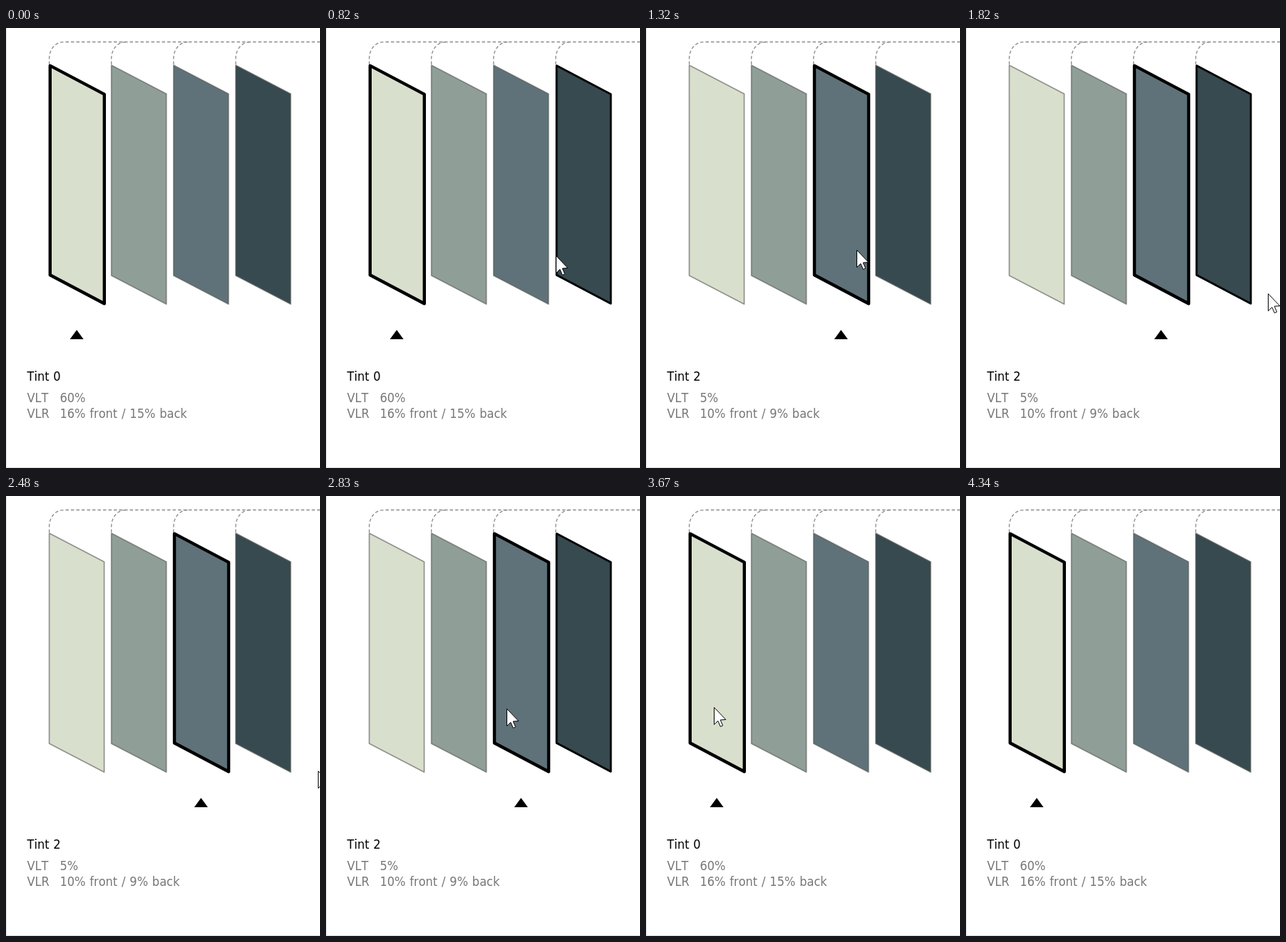
An HTML page with a canvas for the animation above (5180 ms loop, 440 by 615 pixels).

```html
<!DOCTYPE html>
<html lang="en">
<head>
<meta charset="utf-8">
<title>Tint states</title>
<style>
html, body { margin: 0; width: 100%; height: 100%; overflow: hidden; background: #fff; }
canvas { display: block; }
</style>
</head>
<body>
<canvas id="stage" width="440" height="615"></canvas>
<script>
const ctx = document.getElementById('stage').getContext('2d');
const LOOP = 5180;
const TICK = 167; // the pointer is redrawn about six times a second
const WIDTH = 77, SLOPE = 40, TOP = 52, HEIGHT = 294;

const tints = ['#d8dfcd', '#8f9f98', '#5f7279', '#364a50'];
const info = {
  0: ['60%', '16% front / 15% back'],
  2: ['5%', '10% front / 9% back']
};

// Each visit of the pointer: stops as [time, x, y]
const visits = [
  { end: 1980, stops: [[490, 407, 386], [990, 295, 310], [1660, 295, 310], [1820, 423, 371]] },
  { end: 4340, stops: [[2480, 437, 384], [2830, 253, 297], [3170, 171, 295],
    [3330, 100, 295], [3500, 95, 295], [4000, 95, 295], [4170, 153, 327]] }
];
const hover = [
  [0, -1], [820, 3], [990, 2], [1320, -1], [1820, 3], [1980, -1],
  [2830, 3], [3000, 1], [3500, 0], [3670, -1]
];
const selected = [[0, 0], [1320, 2], [3670, 0]];

const at = (track, t) => track.filter(key => key[0] <= t).pop()[1];
const panelX = i => 60.6 + 87.1 * i;
const easeOut = (u, power) => 1 - (1 - u) ** power;
const mix = (a, b, u) => a + (b - a) * u;

function pointerAt(t) {
  const visit = visits.find(({ stops, end }) => t >= stops[0][0] && t < end);
  if (!visit) return null;
  const { stops } = visit;
  const next = stops.findIndex(stop => stop[0] > t);
  if (next < 0) return stops[stops.length - 1].slice(1);
  const [t0, x0, y0] = stops[next - 1];
  const [t1, x1, y1] = stops[next];
  const steps = Math.round((t1 - t0) / TICK);
  const u = Math.floor((t - t0) / (t1 - t0) * steps + 0.09) / steps;
  return [mix(x0, x1, easeOut(u, 1.3)), mix(y0, y1, easeOut(u, 2))].map(Math.round);
}

function polygon(points) {
  ctx.beginPath();
  points.forEach(([x, y]) => ctx.lineTo(x, y));
  ctx.closePath();
}

function stroke(color, width) {
  ctx.strokeStyle = color;
  ctx.lineWidth = width;
  ctx.stroke();
}

function drawFrame() {
  ctx.fillStyle = '#fff';
  ctx.fillRect(0, 0, 440, 615);
  ctx.fillStyle = '#dedede';
  ctx.fillRect(0, 0, 1, 615);
  ctx.fillRect(0, 614, 440, 1);
}

function drawWires() {
  ctx.setLineDash([4.5, 3]);
  tints.forEach((_, i) => {
    const x = panelX(i);
    ctx.beginPath();
    ctx.moveTo(x, 51);
    ctx.lineTo(x, 43);
    ctx.bezierCurveTo(x, 30, x + 8, 19.5, x + 21, 19.5);
    if (!i) ctx.lineTo(440, 19.5);
    stroke('#8b8b8b', 1.3);
  });
  ctx.setLineDash([]);
}

function slab(left, right, top, height) {
  polygon([[left, top], [right, top + SLOPE], [right, top + SLOPE + height], [left, top + height]]);
}

function drawPanel(i, isSelected, isHovered) {
  const x = panelX(i);
  slab(x, x + WIDTH, TOP, HEIGHT);
  ctx.fillStyle = tints[i];
  ctx.fill();
  if (!isSelected && !isHovered) return stroke('rgba(85, 85, 80, 0.6)', 1.7);
  slab(x + 1.2, x + WIDTH + 0.2, TOP + 0.6, HEIGHT - 1.4);
  stroke('#000', isSelected ? 4.4 : 2.8);
}

function drawMarker(x) {
  polygon([[x, 422], [x + 9.5, 435], [x - 9.5, 435]]);
  ctx.fillStyle = '#000';
  ctx.fill();
}

function drawText(index) {
  const [vlt, vlr] = info[index];
  const put = (text, x, y, color) => {
    ctx.fillStyle = color;
    ctx.fillText(text, x, y);
  };
  ctx.font = '18px "DejaVu Sans Condensed", "Noto Sans", sans-serif';
  ctx.fontKerning = 'none';
  ctx.wordSpacing = '0.7px';
  put('Tint ' + index, 29.5, 493, '#000');
  [['VLT', vlt], ['VLR', vlr]].forEach(([label, value], row) => {
    const y = 523 + 22 * row;
    put(label, 29.5, y, '#777');
    put(value, 75.5, y, '#777');
  });
}

function drawPointer([x, y]) {
  const shape = [[0.5, 0.5], [0.5, 24.5], [5.8, 19.3], [9.3, 27.3],
    [12.6, 25.8], [9.2, 18], [16.8, 17.5]];
  polygon(shape.map(([dx, dy]) => [x + dx, y + dy]));
  ctx.fillStyle = '#fff';
  ctx.fill();
  stroke('#000', 1);
}

function render(t) {
  const chosen = at(selected, t);
  const hovered = at(hover, t);
  const pointer = pointerAt(t);
  drawFrame();
  drawWires();
  ctx.lineJoin = 'round';
  tints.forEach((_, i) => drawPanel(i, i === chosen, i === hovered));
  drawMarker(panelX(chosen) + WIDTH / 2);
  drawText(chosen);
  if (pointer) drawPointer(pointer);
}

const start = performance.now();
function tick() {
  render((performance.now() - start) % LOOP);
  requestAnimationFrame(tick);
}
tick();
</script>
</body>
</html>
```
